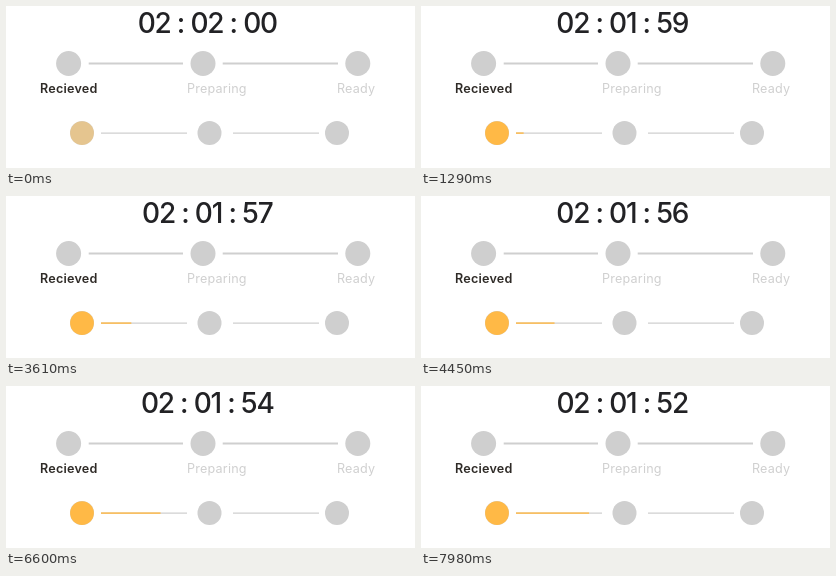
These frames come from a looping animation (409 by 162 pixels, 8 s). An HTML page:

```html
<!DOCTYPE html>
<html lang="en">
<head>
<meta charset="utf-8">
<title>Order progress</title>
<style>
  html, body { margin: 0; width: 100%; height: 100%; overflow: hidden; background: #fff; }
  svg { display: block; width: 409px; height: 162px; }
  text { font-family: Inter, "Open Sans", sans-serif; }
  .timer { font-size: 28px; font-weight: 500; letter-spacing: -1.2px; fill: #222225; }
  .label { font-size: 12.6px; font-weight: 400; letter-spacing: 0.2px; fill: #d0d0d0; }
  .active { font-weight: 600; fill: #2f2b27; }
  .dots { fill: #cfcfcf; }
  .lines { stroke: #cfcfcf; fill: none; }
  .done { fill: #ffb946; }
</style>
</head>
<body>
<svg viewBox="0 0 409 162">
  <text id="timer" class="timer" x="201.3" y="26.8" text-anchor="middle">02 : 02 : 00</text>

  <path class="lines" stroke-width="2.2" d="M82.7 57.5H177M216.7 57.5H332"/>
  <g class="dots">
    <circle cx="62.6" cy="57.5" r="12.5"/>
    <circle cx="197" cy="57.5" r="12.5"/>
    <circle cx="351.8" cy="57.5" r="12.5"/>
  </g>
  <text class="label active" x="34.1" y="87">Recieved</text>
  <text class="label" x="181" y="87">Preparing</text>
  <text class="label" x="330.9" y="87">Ready</text>

  <path class="lines" stroke-width="1.4" d="M95 127.1H181M227 127.1H313"/>
  <rect id="bar" class="done" x="95" y="126.4" width="0" height="1.4"/>
  <g class="dots">
    <circle cx="76" cy="127.1" r="12"/>
    <circle cx="203.5" cy="127.1" r="12"/>
    <circle cx="331" cy="127.1" r="12"/>
  </g>
  <circle id="first" class="done" cx="76" cy="127.1" r="11.9"/>
</svg>
<script>
  const LOOP = 8000;
  const FIRST_TICK = 640;
  const BAR_START = 510;
  const BAR_SPEED = 0.00978; // px per ms
  const DOT_FADE = 370;
  const DOT_ALPHA = 0.46; // the loop opens partway through the fade

  const [timer, bar, first] = ["timer", "bar", "first"].map(id => document.getElementById(id));
  const pad = n => String(n).padStart(2, "0");
  const clock = s => [s / 3600, s / 60 % 60, s % 60].map(n => pad(Math.floor(n))).join(" : ");

  function draw(t) {
    const ticks = t < FIRST_TICK ? 0 : 1 + Math.floor((t - FIRST_TICK) / 1000);
    const label = clock(2 * 3600 + 2 * 60 - ticks);
    if (timer.textContent !== label) timer.textContent = label;

    bar.setAttribute("width", Math.max(0, (t - BAR_START) * BAR_SPEED));

    const p = Math.min(1, t / DOT_FADE);
    const eased = 1 - (1 - p) ** 2;
    first.setAttribute("opacity", DOT_ALPHA + (1 - DOT_ALPHA) * eased);
  }

  const start = performance.now();
  function frame() {
    draw((performance.now() - start) % LOOP);
    requestAnimationFrame(frame);
  }
  frame();
</script>
</body>
</html>
```
